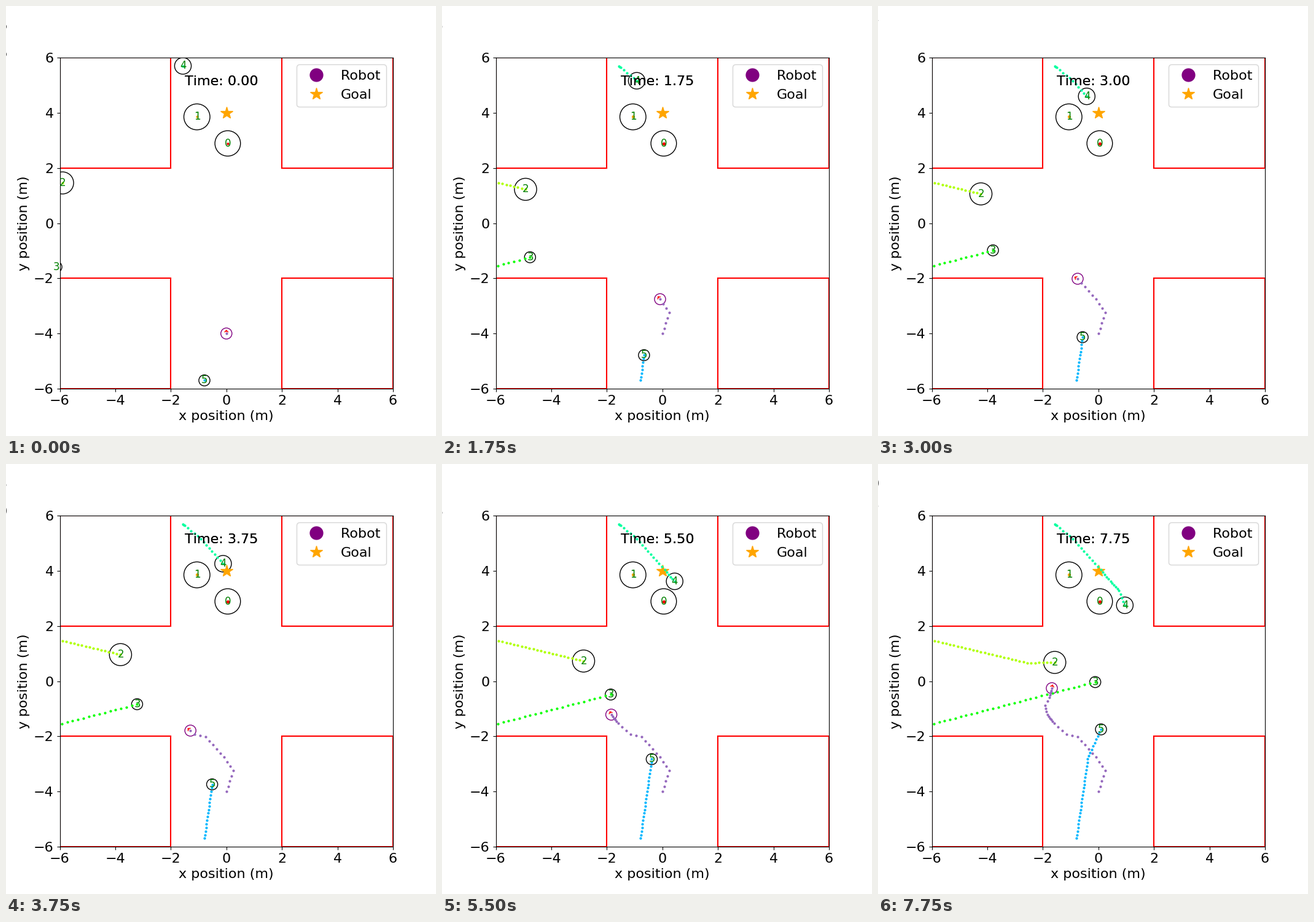
Recreate the animation shown at these times as a matplotlib script. Size 700 by 700 pixels, loop 8000 ms.

```python
import random

import matplotlib as mpl
import matplotlib.pyplot as plt
import numpy as np
from matplotlib.animation import FuncAnimation
from matplotlib.lines import Line2D
from matplotlib.patches import ArrowStyle, Circle, FancyArrowPatch

STEPS, STEP_MS = 32, 250
HALF, WALL = 6, 2
TEXT_SHIFT = 0.11  # moves a label from its circle's centre to its lower left
HEADING_LENGTH = 0.2

plt.rcParams["font.family"] = "DejaVu Sans"
plt.rcParams["text.kerning_factor"] = 6


def walk(*keys):
    """Path in metres through (step, x, y) keys, at even speed between them."""
    t, x, y = np.array(keys, float).T
    steps = np.arange(STEPS)
    return np.column_stack([np.interp(steps, t, x), np.interp(steps, t, y)])


# Each pedestrian: radius and path
people = [
    (0.46, walk((0, 0.048, 2.89))),
    (0.47, walk((0, -1.061, 3.852))),
    (0.4, walk((0, -5.901, 1.458), (24, -2.56, 0.663), (31, -1.572, 0.679))),
    (0.2, walk((0, -6.122, -1.587), (31, -0.114, -0.033))),
    (0.3, walk((0, -1.565, 5.699), (2, -1.499, 5.644), (7, -0.924, 5.161),
               (17, 0.083, 4.03), (22, 0.441, 3.618), (27, 0.742, 3.273),
               (31, 0.952, 2.75))),
    (0.2, walk((0, -0.791, -5.699), (22, -0.382, -2.827), (24, -0.304, -2.594),
               (31, 0.094, -1.748))),
]

robot_path = walk((0, 0, -4), (4, 0.249, -3.239), (7, -0.083, -2.756),
                  (12, -0.747, -2.015), (14, -1.145, -1.926), (17, -1.594, -1.525),
                  (22, -1.839, -1.213), (25, -1.919, -0.879), (27, -1.753, -0.59),
                  (31, -1.676, -0.256))
heading = np.gradient(robot_path, axis=0)
heading[0] = 0, 1
heading *= HEADING_LENGTH / np.linalg.norm(heading, axis=1, keepdims=True)

fig, ax = plt.subplots(figsize=(7, 7), dpi=100)
ax.set(xlim=(-HALF, HALF), ylim=(-HALF, HALF))
ax.tick_params(labelsize=16)
ax.set_xlabel("x position (m)", fontsize=16)
ax.set_ylabel("y position (m)", fontsize=16)

for sx in (-1, 1):
    for sy in (-1, 1):
        near_x, far_x, near_y, far_y = sx * WALL, sx * HALF, sy * WALL, sy * HALF
        ax.plot([near_x, far_x, far_x, near_x, near_x],
                [near_y, near_y, far_y, far_y, near_y], color="red", lw=1.5)

goal = Line2D([0], [4], color="orange", marker="*", ls="None", markersize=15)
ax.add_line(goal)
robot_key = Line2D([0], [0], color="purple", marker="o", ls="None", markersize=15)
ax.legend([robot_key, goal], ["Robot", "Goal"], fontsize=16, loc="upper right")


def add_body(radius, edge, dot):
    circle = ax.add_patch(Circle((0, 0), radius, fill=False, ec=edge, lw=1))
    trail, = ax.plot([], [], "o", color=dot, markersize=2)
    return circle, trail


hues = mpl.colormaps["hsv"].resampled(10)
bodies = [add_body(radius, "black", hues(i)) for i, (radius, _) in enumerate(people)]
numbers = [ax.text(0, 0, str(i), color="green", fontsize=12) for i in range(len(people))]
robot = add_body(0.2, "purple", "tab:purple")
arrow = ax.add_patch(FancyArrowPatch(
    (0, 0), (0, HEADING_LENGTH), color="red",
    arrowstyle=ArrowStyle("->", head_length=2, head_width=2)))
# The clock is laid down twice, which makes it look heavier
clocks = [ax.text(-1.5, 5, "", fontsize=16) for _ in range(2)]
# Two readouts hang off the left edge; only a sliver of the last digit shows
readouts = [ax.text(-8.223, y, "", fontsize=16) for y in (7, 6)]


def place(body, path, n):
    circle, trail = body
    circle.center = tuple(path[n])
    trail.set_data(path[:n + 1, 0], path[:n + 1, 1])


def update(n):
    for body, number, (_, path) in zip(bodies, numbers, people):
        place(body, path, n)
        number.set_position(path[n] - TEXT_SHIFT)
    place(robot, robot_path, n)
    arrow.set_positions(tuple(robot_path[n]), tuple(robot_path[n] + heading[n]))
    for clock in clocks:
        clock.set_text(f"Time: {n * STEP_MS / 1000:.2f}")
    rng = random.Random(n)
    for readout in readouts:
        readout.set_text(str(rng.randrange(10)))
    return []


anim = FuncAnimation(fig, update, frames=STEPS, interval=STEP_MS,
                     init_func=lambda: update(0), repeat=True, repeat_delay=0)
plt.show()
```
